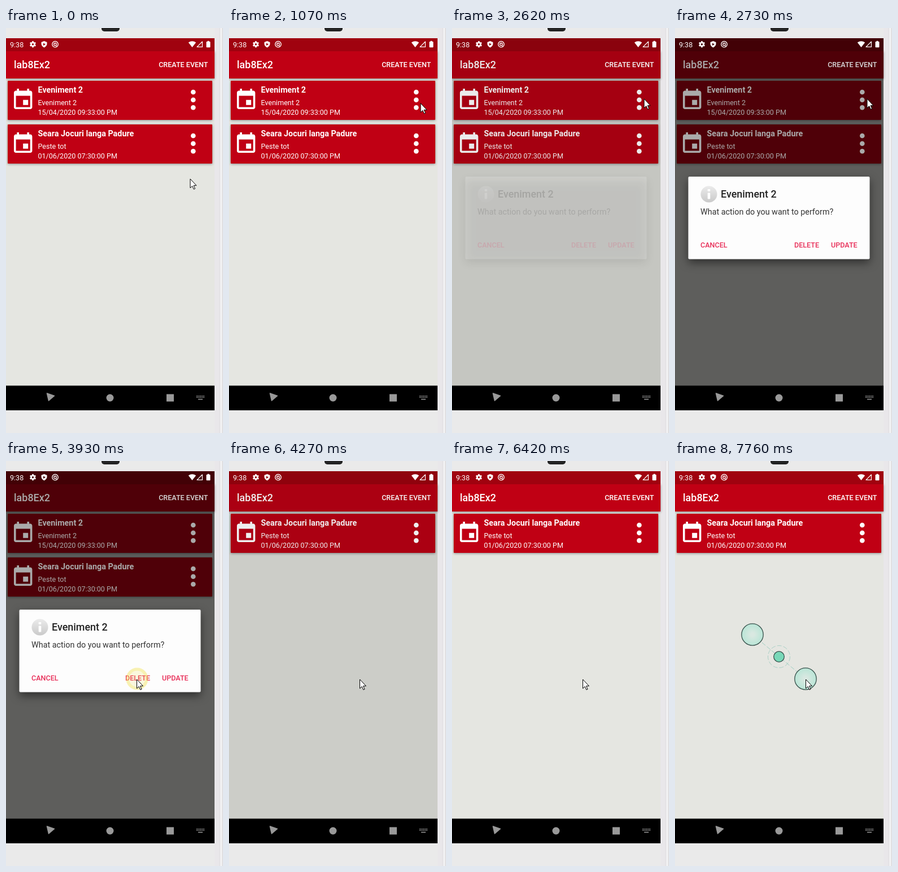
Write an HTML page with a canvas that moves like this. It is 384x714 px and loops after 8.5 s.

```html
<!DOCTYPE html>
<html lang="ro">
<head>
<meta charset="utf-8">
<title>Event list</title>
<style>
  html, body { margin: 0; width: 100%; height: 100%; overflow: hidden; background: #eaeaea; }
  canvas { display: block; width: 384px; height: 714px; }
</style>
</head>
<body>
<canvas id="stage"></canvas>
<script>
const LOOP = 8500;
const RED = '#c00014', PAGE = '#e5e6e1', ACCENT = '#e82e58';
const SMALL = 12.57, BODY = 14.37, TITLE = 17.95;

const canvas = document.getElementById('stage');
const ctx = canvas.getContext('2d');
const ratio = window.devicePixelRatio || 1;
canvas.width = 384 * ratio;
canvas.height = 714 * ratio;

const calendar = new Path2D('M17 12h-5v5h5zM16 1v2H8V1H6v2H5c-1.1 0-2 .9-2 2v14c0 1.1.9 2 2 2h14c1.1 0 2-.9 2-2V5c0-1.1-.9-2-2-2h-1V1zM19 19H5V8h14z');
const arrow = new Path2D('M0 0V16L3.7 12.6L6.3 18.3L8.6 17.3L6.1 11.7H11Z');
const shield = new Path2D('M67.5 23L72.5 25V28.5Q72 32 67.5 34.5Q63 32 62.5 28.5V25ZM66 26.5V31L70 28.7Z');

const events = [
  { name: 'Eveniment 2', place: 'Eveniment 2', date: '15/04/2020 09:33:00 PM' },
  { name: 'Seara Jocuri langa Padure', place: 'Peste tot', date: '01/06/2020 07:30:00 PM' }
];

// Cursor stops: time, x, y. Movement between stops is eased.
const cursorStops = [
  [0, 326, 266], [40, 326, 266], [640, 340, 127], [980, 340, 127], [1510, 328, 199],
  [1730, 328, 199], [2050, 340, 125], [2780, 340, 125], [3640, 231.5, 385], [LOOP, 231.5, 385]
];
const clicks = [{ start: 2050, x: 339.5, y: 125 }, { start: 3714, x: 232, y: 384 }];

const progress = (t, from, to) => Math.min(1, Math.max(0, (t - from) / (to - from)));
const ease = p => p * p * (3 - 2 * p);
const gray = v => `rgb(${v},${v},${v})`;

function rect(x, y, w, h, color, radius = 0) {
  ctx.fillStyle = color;
  ctx.beginPath();
  ctx.roundRect(x, y, w, h, radius);
  ctx.fill();
}

function circle(x, y, r, fill, stroke, width = 1) {
  ctx.beginPath();
  ctx.arc(x, y, r, 0, Math.PI * 2);
  if (fill) { ctx.fillStyle = fill; ctx.fill(); }
  if (stroke) { ctx.strokeStyle = stroke; ctx.lineWidth = width; ctx.stroke(); }
}

function polygon(points, fill, stroke, width = 1) {
  ctx.beginPath();
  points.forEach(([x, y]) => ctx.lineTo(x, y));
  ctx.closePath();
  ctx.lineJoin = 'round';
  if (fill) { ctx.fillStyle = fill; ctx.fill(); }
  if (stroke) { ctx.strokeStyle = stroke; ctx.lineWidth = width; ctx.stroke(); }
}

function text(value, x, y, size, color, weight = 400, align = 'left') {
  ctx.font = `${weight} ${size}px Roboto, sans-serif`;
  ctx.textAlign = align;
  ctx.fillStyle = color;
  ctx.fillText(value, x, y);
}

function layer(alpha, draw) {
  if (alpha <= 0) return;
  ctx.save();
  ctx.globalAlpha = alpha;
  draw();
  ctx.restore();
}

function shadow(color, blur, offset) {
  ctx.shadowColor = color;
  ctx.shadowBlur = blur * ratio;
  ctx.shadowOffsetY = offset * ratio;
}

function drawFrame() {
  rect(0, 0, 384, 714, '#eaeaea');
  rect(369, 0, 9, 714, '#e9e7ea');
  rect(378, 0, 6, 714, '#f0eff1');
  rect(377.5, 0, 1, 714, '#dcdadd');
  rect(383, 0, 1, 714, '#d2d1d3');
  rect(169, -6, 32, 12, '#232323', 5);
}

function drawBackdrop(cards) {
  rect(0, 18, 369, 613, PAGE);
  layer(1, () => {
    shadow('rgba(0,0,0,.4)', 4, 1);
    rect(0, 41, 369, 48, RED);
    cards.forEach((_, i) => rect(3, 93 + 77 * i, 362, 69, RED, 1));
  });
  rect(0, 18, 369, 23, '#a0020f');
}

function drawContent(cards, dim) {
  const ink = gray(Math.round(255 - 85 * dim));
  text('lab8Ex2', 14, 71, TITLE, ink, 500);
  text('CREATE EVENT', 357.5, 69, SMALL, gray(Math.round(255 - 40 * dim)), 500, 'right');
  cards.forEach((card, i) => layer(1, () => {
    ctx.translate(0, 77 * i);
    text(card.name, 56.5, 114, BODY, ink, 700);
    text(card.place, 56.5, 136, SMALL, ink);
    text(card.date, 56.5, 153, SMALL, ink);
    for (const y of [113, 126.7, 140.3]) circle(331.3, y, 4.3, ink);
    ctx.translate(8.6, 105.2);
    ctx.scale(1.8, 1.8);
    ctx.fill(calendar, 'evenodd');
  }));
}

function drawStatusBar() {
  text('9:38', 7, 33.5, SMALL, '#fff');
  for (let i = 0; i < 6; i++) layer(1, () => {
    ctx.translate(47.5, 28.7);
    ctx.rotate(i * Math.PI / 3);
    rect(-1.4, -5.6, 2.8, 3, '#fff');
  });
  circle(47.5, 28.7, 3, null, '#fff', 2.6);
  ctx.fillStyle = '#fff';
  ctx.fill(shield, 'evenodd');
  circle(87, 28.7, 5.2, null, '#fff', 1.4);
  circle(87, 28.7, 2.2, null, '#fff', 1.3);
  polygon([[88, 29.5], [91, 33], [89.5, 33.8]], '#fff');
  ctx.beginPath();
  ctx.moveTo(329.5, 34);
  ctx.lineTo(322.8, 25.6);
  ctx.quadraticCurveTo(329.5, 21, 336.2, 25.6);
  ctx.fill();
  polygon([[338, 33.4], [347.4, 33.4], [347.4, 24]], null, '#fff', 1.2);
  rect(354.5, 24, 7, 10.3, '#fff', 1);
  rect(356.5, 22.8, 3, 2, '#fff');
}

function drawNavigation() {
  rect(0, 630.5, 369, 43.5, '#000');
  polygon([[72.5, 644], [85.5, 648.5], [75.5, 657]], '#999', '#999', 1.5);
  circle(184, 652, 6.5, '#999');
  rect(284, 645.5, 13, 13, '#999');
  for (let row = 0; row < 2; row++)
    for (let col = 0; col < 6; col++) rect(337 + col * 2.5, 648 + row * 2.6, 1.5, 1.5, '#999');
  rect(340, 653.8, 8, 1.5, '#999');
}

function drawDialog() {
  layer(ctx.globalAlpha, () => {
    shadow('rgba(0,0,0,.5)', 16, 6);
    rect(23.5, 262, 321, 145.5, '#fdfdfd', 2);
  });
  const shade = ctx.createLinearGradient(0, 278, 0, 308);
  shade.addColorStop(0, '#ececec');
  shade.addColorStop(1, '#c9c9c9');
  circle(60, 293, 14.5, shade);
  rect(57.7, 284, 4.6, 4, '#fff', 1);
  rect(57.7, 290.5, 4.6, 11, '#fff', 1);
  text('Eveniment 2', 81, 299.3, TITLE, '#222', 500);
  text('What action do you want to perform?', 45, 329, BODY, '#333');
  text('CANCEL', 45, 387, SMALL, ACCENT, 500);
  text('DELETE', 211, 387, SMALL, ACCENT, 500);
  text('UPDATE', 276, 387, SMALL, ACCENT, 500);
}

function drawToast() {
  rect(91, 568, 186, 39, '#ebebe8', 14);
  text('Event Deleted Successfully', 184, 592, SMALL, '#333', 400, 'center');
}

function drawPinch() {
  const teal = '#78d8b8';
  ctx.setLineDash([8, 3]);
  circle(184, 345, 19.5, null, 'rgba(120,190,175,.55)');
  ctx.beginPath();
  ctx.moveTo(137, 306);
  ctx.lineTo(231, 384);
  ctx.strokeStyle = '#9fcfc3';
  ctx.stroke();
  ctx.setLineDash([]);
  for (const [x, y] of [[137, 306], [231, 384]]) {
    const glow = ctx.createRadialGradient(x, y, 3, x, y, 19);
    glow.addColorStop(0, '#d9e8e1');
    glow.addColorStop(1, '#b9e5d6');
    circle(x, y, 19.2, glow, '#38504b', 1.3);
  }
  circle(184, 345, 9.3, teal, '#38504b', 1.3);
}

function drawClick({ start, x, y }, t) {
  const p = (t - start) / 300;
  if (p <= 0 || p >= 1) return;
  const outer = 27 * p, hole = outer * p;
  const alpha = 0.52 * Math.min(1, (1 - p) * 3);
  circle(x, y, hole, `rgba(240,225,70,${alpha * 0.4})`);
  circle(x, y, (outer + hole) / 2, null, `rgba(240,225,80,${alpha})`, outer - hole);
}

function drawCursor(t) {
  const next = cursorStops.findIndex(stop => stop[0] > t);
  const [t0, x0, y0] = cursorStops[next - 1];
  const [t1, x1, y1] = cursorStops[next];
  const p = ease(progress(t, t0, t1));
  layer(1, () => {
    ctx.translate(x0 + (x1 - x0) * p, y0 + (y1 - y0) * p);
    ctx.fillStyle = '#fff';
    ctx.strokeStyle = '#000';
    ctx.lineWidth = 1;
    ctx.fill(arrow);
    ctx.stroke(arrow);
  });
}

function render(t) {
  ctx.setTransform(ratio, 0, 0, ratio, 0, 0);
  const cards = t < 4060 ? events : events.slice(1);
  const dim = progress(t, 2590, 2720) - progress(t, 4060, 4320);
  const dialog = progress(t, 2600, 2720) - progress(t, 4060, 4200);
  const toast = progress(t, 4330, 4800) - progress(t, 6020, 6420);

  drawFrame();
  drawBackdrop(cards);
  layer(dim * 0.59, () => rect(0, 18, 369, 613, '#000'));
  drawContent(cards, dim);
  drawStatusBar();
  drawNavigation();
  layer(dialog, drawDialog);
  layer(toast, drawToast);
  if (t >= 7470) drawPinch();
  clicks.forEach(click => drawClick(click, t));
  drawCursor(t);
}

const begin = performance.now();
function tick() {
  render((performance.now() - begin) % LOOP);
  requestAnimationFrame(tick);
}
tick();
</script>
</body>
</html>
```
